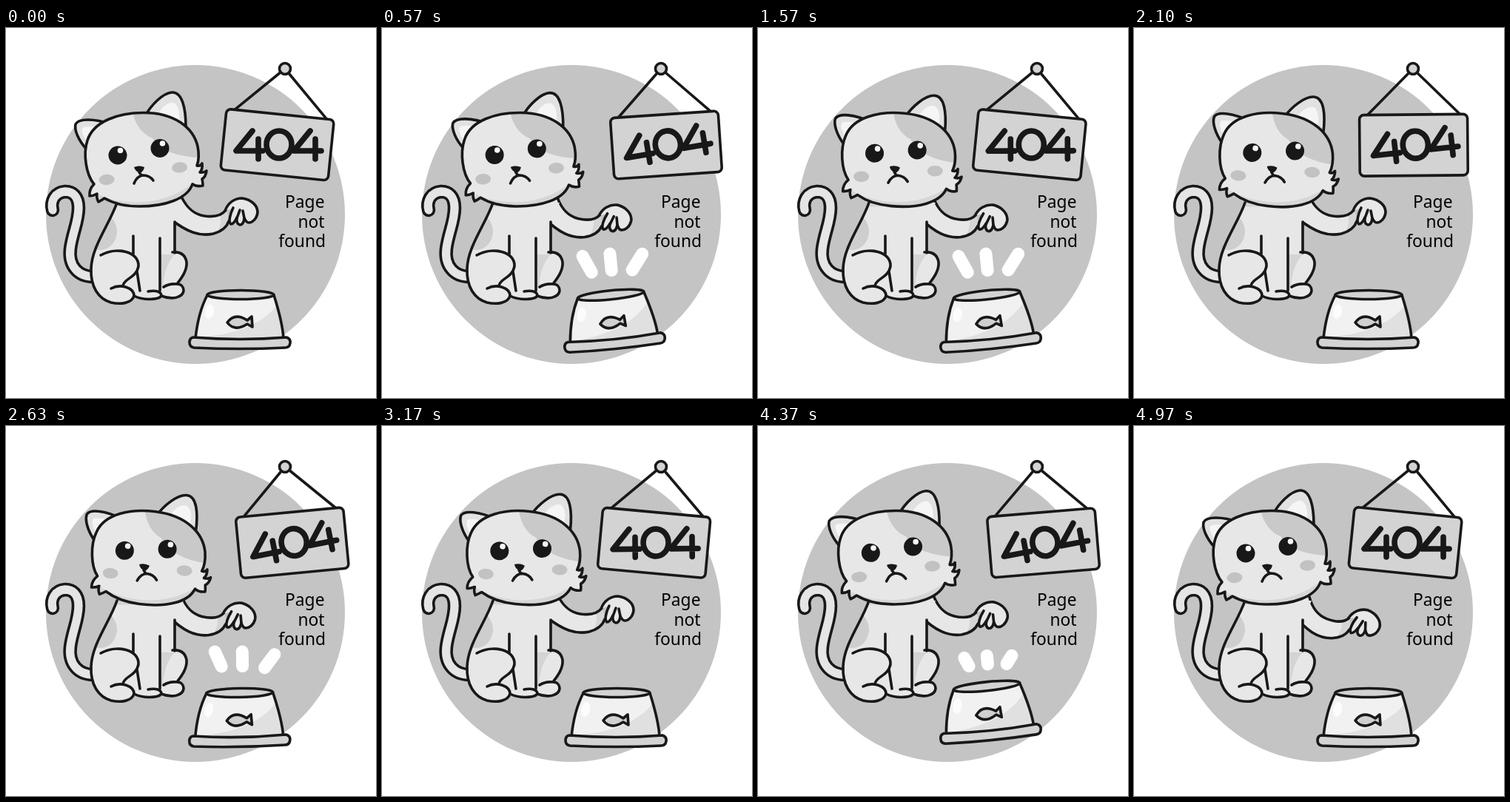
Write an HTML page that moves like this. It is 500 by 500 pixels and loops after 5000 ms.

```html
<!DOCTYPE html>
<html lang="en">
<head>
<meta charset="utf-8">
<title>Page not found</title>
<style>
  html, body { margin: 0; width: 100%; height: 100%; overflow: hidden; background: #fff; }
  svg { display: block; width: 100vw; height: 100vh; }
  .ink { stroke: #181818; stroke-width: 3.6; stroke-linecap: round; stroke-linejoin: round; }
  .line { fill: none; }
  .fur { fill: #e7e7e7; }
  .ear { fill: #e1e1e1; }
  .patch { fill: #c9c9c9; }
  .pale { fill: #f5f5f5; }
  .metal { fill: #d3d3d3; }
  .dark { fill: #181818; }
  .digits { fill: none; stroke: #181818; stroke-width: 7.6; stroke-linecap: round; stroke-linejoin: round; }
  .dash { stroke: #fff; stroke-width: 17; stroke-linecap: round; }
  text { font: 22.8px "Noto Sans", "Open Sans", sans-serif; text-anchor: end; fill: #000; }
</style>
</head>
<body>
<svg viewBox="0 0 500 500">
  <defs>
    <path id="skull" d="M119 211C108 198 104 170 110 152C118 126 152 114.500 186 114.500C227 114.500 253 134 259 160C261 170 261 178 258 186Q263 187 265 183Q266 191 262 195Q268 196 271 193Q270 201 265 204Q266 209 266 213Q258 215 252 211C245 231 215 241 180 241C160 241 145 237 133 230Q129 233 125 235Q122 230 123 224Q118 227 113 227Q112 218 119 211Z"/>
    <path id="torso" d="M150 236C140 265 116 295 115 325C114 350 125 366 142 371C155 374 170 372 173 362C185 368 205 368 210 362C225 368 240 364 240 355C240 348 236 346 231 346C238 338 246 328 244 316C242 306 234 302 228 302L228 262L240 236Z"/>
    <clipPath id="inSkull"><use href="#skull"/></clipPath>
    <clipPath id="inTorso"><use href="#torso"/></clipPath>
    <clipPath id="inBowl"><path d="M272 361C262 380 258 400 256 420H375C374 400 368 380 362 361Z"/></clipPath>
  </defs>

  <circle cx="256" cy="252" r="202" fill="#c4c4c4"/>
  <text x="430.500" y="242.500">Page</text>
  <text x="430.500" y="269.500">not</text>
  <text x="432" y="296">found</text>

  <g id="sign">
    <path class="ink line" d="M315 117L377 55L440 117"/>
    <rect class="ink metal" x="304" y="117" width="146" height="82.500" rx="6"/>
    <g class="digits" transform="rotate(-5.8 377 55)">
      <path d="M333 139L311 166H347M341 150V177"/>
      <ellipse cx="369" cy="157.500" rx="17" ry="18.500"/>
      <path d="M411 139L389 166H426M418 150V177"/>
    </g>
  </g>
  <circle class="ink metal" cx="377" cy="55" r="7.500"/>

  <path id="tailEdge" class="line" stroke="#181818" stroke-width="18.500" stroke-linecap="round"/>
  <path id="tailFur" class="line" stroke="#e5e5e5" stroke-width="11.300" stroke-linecap="round"/>

  <g id="arm">
    <path class="fur" d="M215 232H240C246 245 255 252 268 254C283 256 292 253 297 246L304 262C298 270 292 275 280 278C262 282 245 275 229 264L215 258Z"/>
    <path class="patch" opacity=".6" d="M297 246L289 251Q292 264 286 276C295 272 300 268 304 260Z"/>
    <path class="ink line" d="M238 230C246 245 255 252 268 254C283 256 292 253 297 246M222 258C245 276 262 282 280 278C291 275 298 270 301 261"/>
    <path class="ink fur" d="M296 247C300 236 309 230 319 230C332 232 340 240 340 249C339 258 333 263 328 263Q325 263 322 257Q321 266 316 266Q311 265 312 256Q308 265 304 265C300 262 303 251 307 243"/>
    <path class="ink line" d="M312 257L316 246M322 257L320 247"/>
  </g>

  <use href="#torso" class="fur"/>
  <g clip-path="url(#inTorso)" class="patch">
    <ellipse cx="127" cy="275" rx="23" ry="25" opacity=".8"/>
    <path d="M140 230H238Q210 244 142 241Z" opacity=".65"/>
    <path d="M208 306H228Q213 322 212 352H208Z" opacity=".6"/>
  </g>

  <g class="ink line">
    <path d="M150 236C140 265 116 295 115 325C114 350 125 366 142 371C155 374 170 372 173 362C173 351 155 345 142 352"/>
    <path d="M128 307C150 295 180 302 179 322C176 338 160 338 158 348"/>
    <path d="M228 262V304M172 281V305M208 284V355M177 329L181 355"/>
    <path d="M173 362C185 368 205 368 210 362C210 356 202 354 192 356"/>
    <path d="M225 303C235 302 242 306 244 316C245 328 237 338 231 346C237 346 240 350 240 355C239 364 225 368 210 362M231 346Q220 345 213 350"/>
  </g>

  <g id="head">
    <path class="ink ear" d="M109 164C98 152 92 138 94 130C98 122 119 122 142 130"/>
    <path class="pale" d="M109 153C102 143 101 135 105 134C115 132 126 134 133 136Q117 142 109 153Z"/>
    <path class="ink ear" d="M188 119C196 104 212 88 224 87C238 86 243 108 243 134"/>
    <path class="pale" d="M206 116C211 106 219 100 226 101C233 104 235 114 234 126Q221 117 206 116Z"/>
    <use href="#skull" class="fur"/>
    <path class="patch" clip-path="url(#inSkull)" d="M170 110Q176 140 198 149Q214 174 264 175V100Z"/>
    <path class="patch" opacity=".55" clip-path="url(#inSkull)" d="M125 225C160 241 215 241 254 208V245H125Z"/>
    <use href="#skull" class="ink line"/>
    <g class="dark">
      <circle cx="151" cy="172" r="12.500"/>
      <circle cx="208" cy="162.500" r="12.500"/>
      <path d="M173 188Q180 185 187 188Q186 194 181 196Q174 193 173 188Z"/>
    </g>
    <g class="pale">
      <circle cx="154.500" cy="165.500" r="3.800"/>
      <circle cx="211.500" cy="156" r="3.800"/>
    </g>
    <g fill="#c2c2c2">
      <ellipse cx="136" cy="205" rx="10.500" ry="7.200" transform="rotate(-4 136 205)"/>
      <ellipse cx="234.500" cy="188.500" rx="10.500" ry="7.200" transform="rotate(-4 234 188)"/>
    </g>
    <path class="ink line" d="M180 195L183 199M173 210Q177 200 185 199Q194 199 199 206"/>
  </g>

  <g id="bowl">
    <g id="dashes"></g>
    <g clip-path="url(#inBowl)">
      <path fill="#f1f1f1" d="M250 355H380V422H250Z"/>
      <path fill="#e0e0e0" d="M256 418C300 416 345 404 366 374L380 422H256Z"/>
      <ellipse cx="275" cy="383" rx="6" ry="10" fill="#fff" opacity=".8" transform="rotate(12 275 383)"/>
    </g>
    <path class="ink line" d="M272 361C262 380 258 400 256 420M362 361C368 380 374 400 375 420"/>
    <ellipse class="ink metal" cx="317" cy="360.500" rx="45" ry="6"/>
    <path class="ink metal" d="M253 418Q316 423 379 418Q385 420 384 426Q383 432 377 432Q316 435 254 432Q248 431 248 425Q248 419 253 418Z"/>
    <path class="ink" fill="#d0d0d0" d="M299 398Q309 384 326 395L332 390L333 404L326 400Q309 411 299 398Z"/>
  </g>
</svg>
<script>
  const LOOP = 5000, BEAT = 1000, TAU = 2 * Math.PI;
  const el = id => document.getElementById(id);
  const mix = (a, b, k) => a + (b - a) * k;
  const ramp = (x, a, b) => Math.min(1, Math.max(0, (x - a) / (b - a)));
  const smooth = k => k * k * (3 - 2 * k);
  const rise = (x, a, b) => smooth(ramp(x, a, b));
  const pulse = (x, a, b, c, d) => rise(x, a, b) - rise(x, c, d);

  // Cosine swing from 1 to -1 that lingers a little at both ends.
  const sway = turns => Math.sin(Math.cos(turns * TAU) * 1.25) / Math.sin(1.25);

  // The tail bends more the higher it gets above its root.
  const tailRoot = 336, tailHeight = 115;
  const tailPoints = [[118, 336], [98, 336], [84, 322], [87, 298], [90, 276], [98, 262], [98, 243],
    [98, 227], [90, 221], [80, 221], [66, 222], [60, 234], [63, 246]];

  function tailPath(bend) {
    const pts = tailPoints.map(([x, y]) => {
      const h = (tailRoot - y) / tailHeight;
      return [x - 12 * bend * h, y + 10 * bend * h];
    });
    return `M${pts[0]}C${pts.slice(1)}`;
  }

  const rays = [[296, 331, 284.5, 304.5], [321.5, 331, 321.5, 305], [347, 333, 365, 309.5]].map(ends => {
    const line = document.createElementNS("http://www.w3.org/2000/svg", "line");
    line.setAttribute("class", "dash");
    el("dashes").append(line);
    return { line, ends };
  });

  function drawRays(from, to) {
    for (const { line, ends: [x1, y1, x2, y2] } of rays) {
      const set = (name, value) => line.setAttribute(name, value);
      set("visibility", to - from > .01 ? "visible" : "hidden");
      set("x1", mix(x1, x2, from));
      set("y1", mix(y1, y2, from));
      set("x2", mix(x1, x2, to));
      set("y2", mix(y1, y2, to));
    }
  }

  function turn(id, angle, x, y, dy = 0) {
    el(id).setAttribute("transform", `translate(0 ${dy}) rotate(${angle} ${x} ${y})`);
  }

  function draw(ms) {
    const t = ms % LOOP / LOOP;
    const p = ms % BEAT / BEAT * 30; // position in the beat, 0 to 30

    turn("sign", 5.8 * sway(3 * t), 377, 55);
    turn("head", 3.75 * (1 - Math.cos(t * TAU)), 184, 242);

    const reach = .48 * rise(p, 5, 13) - .34 * rise(p, 19, 22) + .86 * rise(p, 22, 29);
    turn("arm", 13 * reach, 235, 225);

    const tilt = 5.8 * (pulse(p, 22, 25, 25, 28) - pulse(p, 7, 10.5, 17, 19.6));
    turn("bowl", tilt, 316, 440, -9 * pulse(p, 7, 10, 12, 16));

    const tail = tailPath(pulse(p, 19, 22.6, 24.3, 28));
    el("tailEdge").setAttribute("d", tail);
    el("tailFur").setAttribute("d", tail);

    drawRays(ramp(p, 12, 26) ** 2, ramp(p, 8, 15));
  }

  const start = performance.now();
  function tick() {
    draw(performance.now() - start);
    requestAnimationFrame(tick);
  }
  draw(0);
  requestAnimationFrame(tick);
</script>
</body>
</html>
```
